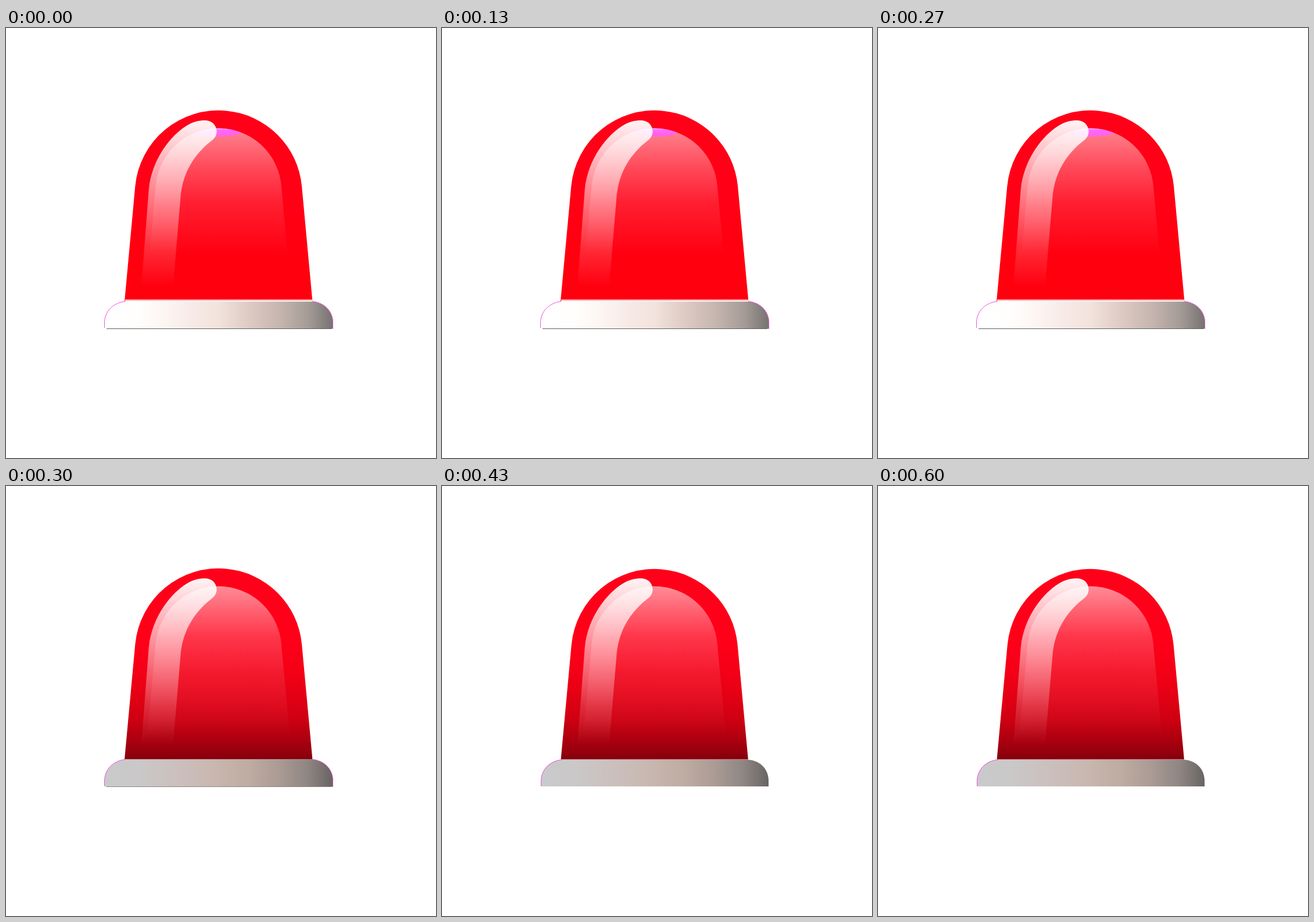
An HTML page with a canvas that plays this animation: 740x740 px, repeating every 0.63 s.

```html
<!DOCTYPE html>
<html lang="en">
<head>
<meta charset="utf-8">
<title>Warning light</title>
<style>
html, body { margin: 0; width: 100%; height: 100%; overflow: hidden; background: #fff; }
canvas { display: block; }
</style>
</head>
<body>
<canvas id="stage" width="740" height="740"></canvas>
<script>
const ctx = document.getElementById('stage').getContext('2d');
const LOOP = 630, LIT_UNTIL = 300, SETTLED_FROM = 330;
const CENTER = 365.7, SLOPE = 0.0925;

const DOME_DARK = [[142, '#ff001a'], [260, '#ff0019'], [310, '#f60017'], [350, '#e90015'],
  [400, '#cf0012'], [440, '#a9000f'], [470, '#86000c']];
const DOME_LIT = [[142, '#ff0018'], [280, '#ff0016'], [400, '#ff000f'], [470, '#ff000f']];
const BASE_DARK = [[169, '#c9cacc'], [230, '#cac8c8'], [300, '#cbbfbc'], [360, '#c8b7af'],
  [420, '#beaba2'], [470, '#aa9b94'], [520, '#8e8582'], [563, '#676362']];
const BASE_LIT = [[169, '#ffffff'], [230, '#fffefd'], [270, '#fdf6f3'], [330, '#f6e8e4'],
  [365, '#f2e3dc'], [420, '#dccac3'], [470, '#c6b6af'], [520, '#a59b96'], [563, '#757271']];

const white = alpha => `rgba(255,255,255,${alpha})`;

function gradient(stops, horizontal) {
  const start = stops[0][0], end = stops[stops.length - 1][0];
  const g = horizontal ? ctx.createLinearGradient(start, 0, end, 0)
                       : ctx.createLinearGradient(0, start, 0, end);
  for (const [at, color] of stops) g.addColorStop((at - start) / (end - start), color);
  return g;
}

function fill(path, stops, horizontal = false) {
  ctx.fillStyle = gradient(stops, horizontal);
  ctx.fill(path);
}

// Round top that runs into straight, slightly spreading sides.
function bell(top, radius, bottom) {
  const p = new Path2D(), tilt = Math.atan(SLOPE), cy = top + radius;
  const endX = radius * Math.cos(tilt), endY = cy - radius * Math.sin(tilt);
  const foot = endX + (bottom - endY) * SLOPE;
  p.moveTo(CENTER - foot, bottom);
  p.arc(CENTER, cy, radius, Math.PI + tilt, -tilt);
  p.lineTo(CENTER + foot, bottom);
  p.closePath();
  return p;
}

function basePath(inset) {
  const l = 169.5 + inset, r = 563 - inset, top = 470.5 + inset / 2, bottom = 517.5 - inset / 2;
  return new Path2D(`M${l} ${bottom}V508C${l} 488 184 473 206 ${top}H527
    C549 473 ${r} 488 ${r} 508V${bottom}Z`);
}

const shine = new Path2D(`M233 445L245.7 278C251 224 285 184 311 168C322 161 333 158.8 343.5 159
  C355 159.2 362.5 168 362.5 178C362.5 184 360 189 355 193C321 219 303 253 300.2 294L287.5 445Z`);
const glow = bell(172.5, 108.5, 430);
const leftRim = new Path2D('M169.5 516V508C169.5 488 184 473 205 470.5');
const rightRim = new Path2D('M528 470.5C549 473 562.5 488 562.5 508V516');

function stroke(path, color) {
  ctx.strokeStyle = color;
  ctx.lineWidth = 1;
  ctx.stroke(path);
}

function draw(lit, inset) {
  ctx.fillStyle = '#fff';
  ctx.fillRect(0, 0, 740, 740);

  fill(bell(141.8 + inset, 144 - inset / 2, 470.5), lit ? DOME_LIT : DOME_DARK);
  fill(glow, lit
    ? [[172, white(0.52)], [190, white(0.46)], [240, white(0.29)], [300, white(0.12)], [390, white(0)]]
    : [[172, white(0.55)], [215, white(0.38)], [260, white(0.21)], [320, white(0.1)], [430, white(0)]]);

  if (lit) {
    ctx.save();
    ctx.clip(glow);
    ctx.fillStyle = gradient([[172, '#ffa8ff'], [176, '#ff68ff'], [183, '#ff62ee'], [188, '#ff6eaa']]);
    ctx.beginPath();
    ctx.ellipse(CENTER, 172, 47, 16, 0, 0, Math.PI * 2);
    ctx.fill();
    ctx.restore();
  }

  fill(shine, [[159, white(0.96)], [230, white(0.69)], [300, white(0.45)], [380, white(0.17)], [445, white(0)]]);

  fill(basePath(inset), lit ? BASE_LIT : BASE_DARK, true);

  if (lit) {
    ctx.fillStyle = gradient([[466, white(0)], [469, white(0.9)], [471, white(0.9)]]);
    ctx.fillRect(205, 466, 322, 5);
  }

  ctx.save();
  ctx.translate(inset, inset / 2);
  stroke(leftRim, '#f04ee0');
  ctx.restore();
  if (!inset) {
    stroke(rightRim, '#ee4fd0');
    ctx.fillStyle = lit ? '#625e5e' : '#8b8584';
    ctx.fillRect(173, 517, 387, 1);
  }
}

function frame() {
  const t = performance.now() % LOOP;
  draw(t < LIT_UNTIL, t < SETTLED_FROM ? 0 : 1);
  requestAnimationFrame(frame);
}
frame();
</script>
</body>
</html>
```
